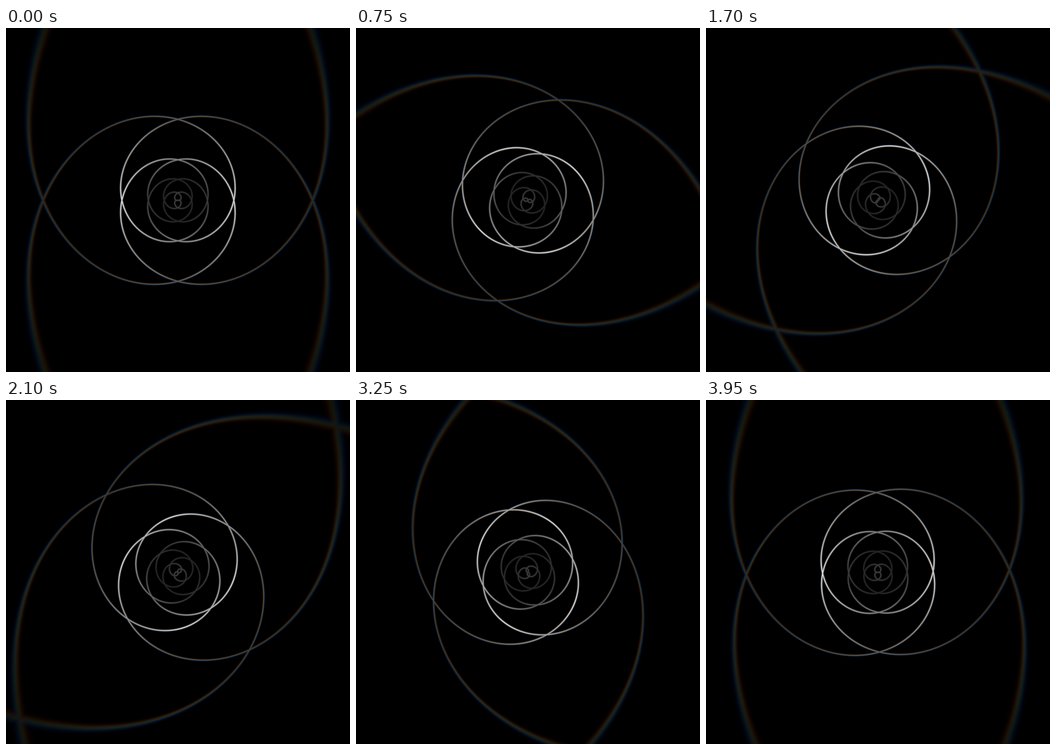
An HTML page with a canvas that plays this animation: 540 px wide and 540 px high, repeating every 4000 ms.

```html
<!DOCTYPE html>
<html lang="en">
<head>
<meta charset="utf-8">
<title>Spiral tunnel</title>
<style>
  html, body { margin: 0; height: 100%; overflow: hidden; background: #000; }
  canvas { display: block; width: 540px; height: 540px; }
</style>
</head>
<body>
<canvas id="stage" width="540" height="540"></canvas>
<script>
const SIZE = 540, COUNT = SIZE * SIZE, LOOP = 4000, STEP = 50;
const CX = 269.3, CY = 270;
const ctx = document.getElementById('stage').getContext('2d');
const image = ctx.createImageData(SIZE, SIZE);
const px = image.data;

// Tunnel profile: u is the position along the axis, in quarter turns.
const NEAR = 6.53, WIDE = 324, BEND = 4.65, CURVE = 0.0157, FAR = -3.33;
const bend = u => Math.max(0, BEND - u);
const tube = u => WIDE * (1 - CURVE * bend(u) ** 2);
const radius = u => tube(u) / (NEAR - u);
const slope = u => (2 * WIDE * CURVE * bend(u) + radius(u)) / (NEAR - u);

function depthAt(r) {
  let lo = FAR, hi = 6.4;
  for (let i = 0; i < 20; i++) {
    const mid = (lo + hi) / 2;
    if (radius(mid) < r) lo = mid; else hi = mid;
  }
  return lo;
}

// Brightness at u = -4, -3, ... 7
const LIGHT = [60, 65, 60, 42, 40, 60, 135, 230, 95, 44, 6, 2];
function light(u) {
  const i = Math.floor(u + 4), f = u + 4 - i;
  return LIGHT[i] * (1 - f) + LIGHT[i + 1] * f;
}
const blur = u => 0.87 + 4 * Math.max(0, (u - 4.2) / 1.4) ** 3;

const map = () => new Float32Array(COUNT);
const depth = map(), turn = map(), scale = map();
const glow = map(), sharp = map(), fringe = map(), reach = map();

for (let i = 0; i < COUNT; i++) {
  const x = i % SIZE - CX, y = Math.floor(i / SIZE) - CY;
  const r = Math.max(0.1, Math.hypot(x, y)), u = depthAt(r), s = blur(u);
  depth[i] = u;
  turn[i] = Math.atan2(y, x) * 2 / Math.PI;
  scale[i] = 1 / Math.hypot(1 / slope(u), 2 / (Math.PI * r));
  glow[i] = light(u);
  sharp[i] = 0.5 / (s * s);
  fringe[i] = 1.1 * (r / 212) ** 2.5;
  reach[i] = 3 * s + fringe[i];
  px[i * 4 + 3] = 255;
}

// Lights pixel i from one pair of arms; f is the phase from the arm.
function addArm(i, f) {
  const d = (f - 2 * Math.round(f / 2)) * scale[i];
  if (Math.abs(d) > reach[i]) return;
  for (let c = 0; c < 3; c++) {
    const e = d + (1 - c) * fringe[i], k = i * 4 + c;
    px[k] = Math.max(px[k], glow[i] * Math.exp(-e * e * sharp[i]));
  }
}

function draw(t) {
  const right = 3 + t, left = 1 + t / 2;
  for (let i = 0; i < COUNT; i++) {
    px[i * 4] = px[i * 4 + 1] = px[i * 4 + 2] = 0;
    addArm(i, depth[i] + turn[i] - right);
    addArm(i, depth[i] - turn[i] - left);
  }
  ctx.putImageData(image, 0, 0);
}

const start = performance.now();
let shown = -1;
function tick() {
  const time = (performance.now() - start) % LOOP;
  const step = Math.floor(time / STEP);
  if (step !== shown) draw(step * STEP / 1000);
  shown = step;
  requestAnimationFrame(tick);
}
tick();
</script>
</body>
</html>
```
